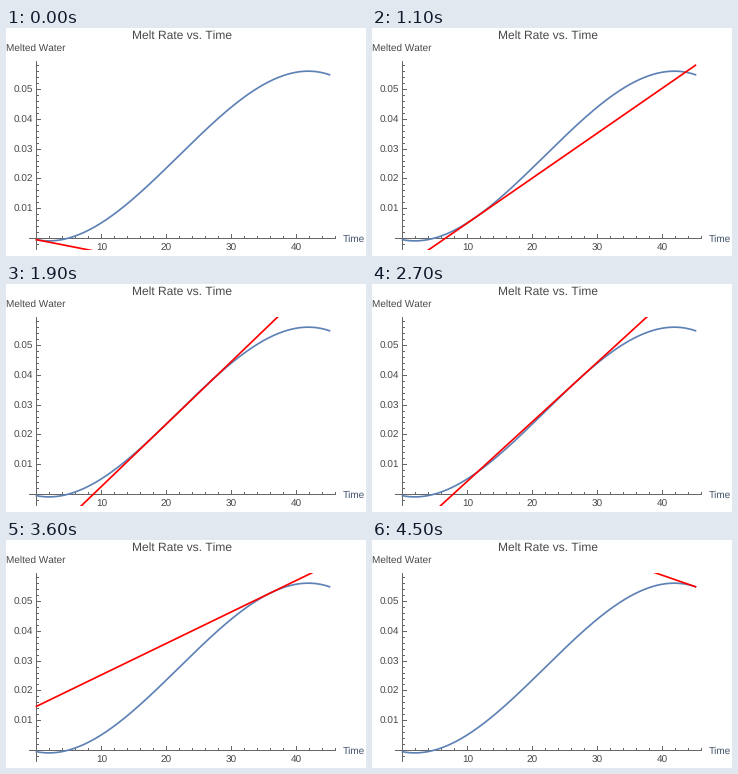
Write a matplotlib script that moves like this. It is 360 px wide and 228 px high and loops after 4.6 s.

```python
import numpy as np
import matplotlib.pyplot as plt
from matplotlib.animation import FuncAnimation
from matplotlib.collections import LineCollection
from matplotlib.patches import Rectangle

plt.rcParams.update({"font.family": "Liberation Sans", "text.hinting": "none",
                     "text.hinting_factor": 1})

W, H, DPI = 360, 228, 72          # at 72 dpi one point is one pixel
X0, Y0 = 30.5, 210.5              # plot origin in pixels
SX, SY = 6.51, 2980               # pixels per unit
LEFT, RIGHT, TOP, BOTTOM = 23, 330, 33, 222
T_END = 45
GREY, TEXT = "#666666", "#484848"

# cubic with turning points LO and HI
K, LO, HI, SHIFT = 5.4e-6, 1.9, 41.75, -0.0004


def melted(t):
    return SHIFT - K * (t**3 / 3 - (LO + HI) * t**2 / 2 + LO * HI * t)


def rate(t):
    return -K * (t - LO) * (t - HI)


def px(t):
    return X0 + SX * t


def py(v):
    return Y0 - SY * v


def mid(p):
    """Centre of the pixel that holds p."""
    return np.floor(p) + 0.5


fig = plt.figure(figsize=(W / DPI, H / DPI), dpi=DPI, facecolor="white")
ax = fig.add_axes([0, 0, 1, 1])
ax.set_xlim(0, W)
ax.set_ylim(H, 0)
ax.axis("off")


def label(x, y, s, size=10, ha="left", color=TEXT):
    ax.text(x, y, s, size=size, ha=ha, va="baseline", color=color)


# axes and ticks
segments = [[(LEFT, Y0), (RIGHT, Y0)], [(X0, TOP), (X0, BOTTOM)]]
for t in range(0, 47, 2):
    x = mid(px(t))
    size = 4.5 if t % 10 == 0 else 2.5
    segments.append([(x, Y0), (x, Y0 - size)])
for i in range(-1, 30):
    y = mid(py(i * 0.002))
    size = 4.5 if i % 5 == 0 else 2.5
    segments.append([(X0, y), (X0 + size, y)])
ax.add_collection(LineCollection(segments, colors=GREY, linewidths=1,
                                 snap=False, zorder=1))

for t in range(10, 50, 10):
    label(px(t) - 0.3, 223, str(t), ha="center")
for i in range(1, 6):
    label(27.5, py(i / 100) + 3.5, f"{i / 100:.2f}", ha="right")

label(176, 11, "Melt Rate vs. Time", size=12, ha="center")
label(0, 23, "Melted Water")
label(337, 214, "Time", color="#41526b")

ts = np.linspace(0, T_END, 300)
ax.plot(px(ts), py(melted(ts)), color="#5e81b5", lw=1.7, zorder=2)

tangent, = ax.plot([], [], color="red", lw=1.7, zorder=3)
tangent.set_clip_path(Rectangle((LEFT, TOP), RIGHT - LEFT, BOTTOM - TOP,
                                transform=ax.transData))


def update(t):
    ends = np.array([0, T_END])
    tangent.set_data(px(ends), py(melted(t) + rate(t) * (ends - t)))
    return tangent,


anim = FuncAnimation(fig, update, frames=T_END + 1, interval=100,
                     repeat=True, repeat_delay=0)
plt.show()
```
